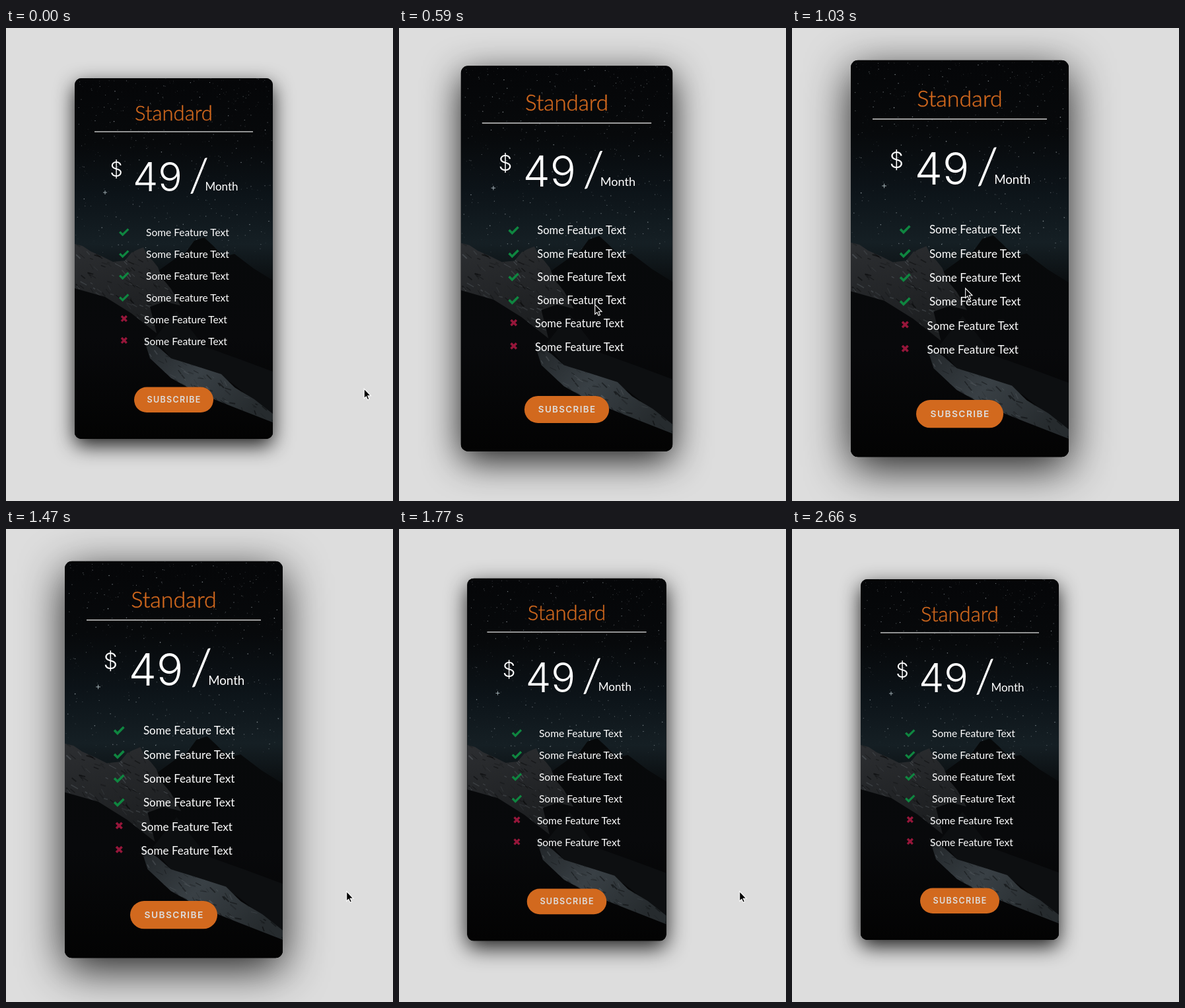
Write an HTML page that moves like this. It is 586 px wide and 716 px high and loops after 3090 ms.

```html
<!DOCTYPE html>
<html lang="en">
<head>
<meta charset="utf-8">
<title>Pricing card</title>
<style>
html, body { margin: 0; width: 100%; height: 100%; overflow: hidden; background: #ddd; }
#card {
  position: absolute; left: 104px; top: 76px; width: 300px; height: 546px;
  border-radius: 10px; background: #030303;
}
#card svg { display: block; width: 100%; height: 100%; border-radius: 10px; }
#cursor { position: absolute; left: 0; top: 0; width: 16px; height: 22px; overflow: visible; }
text { font-family: Lato, sans-serif; fill: #fff; text-anchor: middle; }
.light { font-weight: 300; }
.price { font-family: Inter, sans-serif; font-weight: 300; }
</style>
</head>
<body>
<div id="card">
  <svg viewBox="104 76 300 546">
    <defs>
      <linearGradient id="sky" x1="0" y1="0" x2="0" y2="1">
        <stop offset="0" stop-color="#050608"/>
        <stop offset=".18" stop-color="#07090b"/>
        <stop offset=".32" stop-color="#0c1318"/>
        <stop offset=".46" stop-color="#151f24"/>
        <stop offset=".6" stop-color="#060708"/>
      </linearGradient>
      <linearGradient id="rock" x1="0" y1="0" x2=".3" y2="1">
        <stop offset="0" stop-color="#2c2e31"/>
        <stop offset="1" stop-color="#1c1e20"/>
      </linearGradient>
      <linearGradient id="snow" x1="0" y1="0" x2="1" y2=".6">
        <stop offset="0" stop-color="#202427"/>
        <stop offset=".5" stop-color="#394045"/>
        <stop offset="1" stop-color="#262b2e"/>
      </linearGradient>
      <linearGradient id="base" x1="0" y1="0" x2="0" y2="1">
        <stop offset="0" stop-color="#07090a"/>
        <stop offset=".5" stop-color="#08090b"/>
        <stop offset="1" stop-color="#030303"/>
      </linearGradient>
      <clipPath id="lit">
        <path id="slope" d="M104 327L116 330 128 338 146 346 162 354 180 352 190 340 198 336 208 332 214 344 222 352 230 362 236 378 250 395 264 420 240 414 218 422 228 462 190 432 150 407 104 394Z"/>
        <path id="glacier" d="M208 468L232 484 250 500 282 510 326 524 346 544 376 562 404 584V597L345 574 290 552 250 530 218 500Z"/>
      </clipPath>
    </defs>
    <rect x="104" y="76" width="300" height="546" fill="url(#sky)"/>
    <g id="stars" fill="#c3ccd2"></g>
    <path d="M150 246V252M147 249H153" stroke="#aab8bd" stroke-width=".9"/>
    <path d="M104 390L230 368 255 350 272 340 285 322 300 317 312 328 330 346 346 342 375 364 404 382V623H104Z" fill="url(#base)"/>
    <path d="M258 428L300 482 350 500 404 520V586L340 536 300 519 250 500 225 470Z" fill="#0d0f11"/>
    <use href="#slope" fill="url(#rock)"/>
    <use href="#glacier" fill="url(#snow)"/>
    <g id="facets" clip-path="url(#lit)"></g>

    <text class="light" x="254" y="139.5" font-size="31" style="fill:#d2691e;stroke:#d2691e;stroke-width:.4">Standard</text>
    <rect x="134" y="156.2" width="240" height="1.6" fill="#b4b4b4"/>
    <text class="price" x="167" y="224.5" font-size="31">$</text>
    <text class="price" x="229.5" y="247" font-size="61">49</text>
    <text class="light" x="292" y="246.5" font-size="68" stroke="#fff" stroke-width=".8">/</text>
    <text x="326.5" y="246" font-size="17">Month</text>
    <g id="features"></g>
    <rect x="194" y="543.6" width="120" height="38.4" rx="19.2" fill="#d2691e"/>
    <text x="254.6" y="567.2" font-size="12.5" font-weight="600" letter-spacing="1.3"
      style="font-family:Inter,sans-serif;fill:#ddd">SUBSCRIBE</text>
  </svg>
</div>
<svg id="cursor"><path d="M1.7 1.7V16.2L4.9 13.3 7.1 18.2 9.5 17.2 7.3 12.3H12Z"
  fill="#000" stroke="#fff" stroke-width="1.1"/></svg>
<script>
const $ = id => document.getElementById(id);
const card = $("card"), cursor = $("cursor");
const LOOP = 3090;

let seed = 7;
const rnd = (a, b) => {
  seed = (seed * 16807) % 2147483647;
  return a + (b - a) * seed / 2147483647;
};
const repeat = (n, make) => Array.from({ length: n }, (_, i) => make(i)).join("");

$("stars").innerHTML = repeat(750, () =>
  `<circle cx="${rnd(104, 404)}" cy="${76 + 265 * rnd(0, 1) ** 1.2}" r="${rnd(.3, .75)}" opacity="${rnd(0, 1) ** 2 * .65}"/>`);

// Short strokes that roughen the lit rock and snow
$("facets").innerHTML = repeat(700, i => {
  const x = rnd(104, 404), y = i % 2 ? rnd(325, 465) : rnd(465, 600);
  return `<path d="M${x} ${y}l${rnd(2, 10)} ${rnd(1, 8)}" stroke="${i % 3 ? "#08090a" : "#5a6065"}" stroke-width="${rnd(.6, 2)}" opacity="${rnd(.15, .6)}"/>`;
});

$("features").innerHTML = repeat(6, i => {
  const y = 309 + 33 * i, on = i < 4;
  const icon = on
    ? `<path d="M172.2 ${y - .4}l4.4 4.4 8.7-8.7" stroke="#0f8640"`
    : `<path d="M174.9 ${y - 5}l7.8 7.8m0-7.8l-7.8 7.8" stroke="#96163a"`;
  return icon + ` fill="none" stroke-width="3.3"/>
    <text x="${on ? 275 : 272}" y="${y + 5.8}" font-size="15.5">Some Feature Text</text>`;
});

// Each step: time, then the pointer's place while it is visible
const steps = [
  [0, 540.5, 544.5], [300, 540.5, 543.5], [440, 301, 419], [590, 295, 417],
  [730, 283, 410], [880, 268, 399], [1030, 261, 392.5], [1330, 278.5, 399.5],
  [1470, 514, 547], [1620, 514, 547], [1770, 514, 547], [1920, 514, 547],
  [2070], [2370, 564, 650], [2510, 562, 703], [2660]
];

// Same curve as CSS "ease"
function ease(p) {
  if (p <= 0) return 0;
  if (p >= 1) return 1;
  let lo = 0, hi = 1, u;
  for (let i = 0; i < 24; i++) {
    u = (lo + hi) / 2;
    const x = .75 * u * (1 - u) ** 2 + .75 * u * u * (1 - u) + u ** 3;
    if (x < p) lo = u; else hi = u;
  }
  return .3 * u * (1 - u) ** 2 + 3 * u * u * (1 - u) + u ** 3;
}

function draw(now) {
  const t = now % LOOP;
  const [at, x, y] = steps.findLast(s => s[0] <= t);
  const hover = ease((at - 426) / 410) - ease((at - 1480) / 400);
  card.style.transform = `scale(${1 + .1 * hover})`;
  card.style.boxShadow = `0 ${10 + 5 * hover}px ${30 + 30 * hover}px rgba(0, 0, 0, .87)`;
  cursor.style.display = x ? "block" : "none";
  if (x) cursor.style.transform = `translate(${x}px, ${y}px)`;
}

const start = performance.now();
(function tick() {
  draw(performance.now() - start);
  requestAnimationFrame(tick);
})();
</script>
</body>
</html>
```
